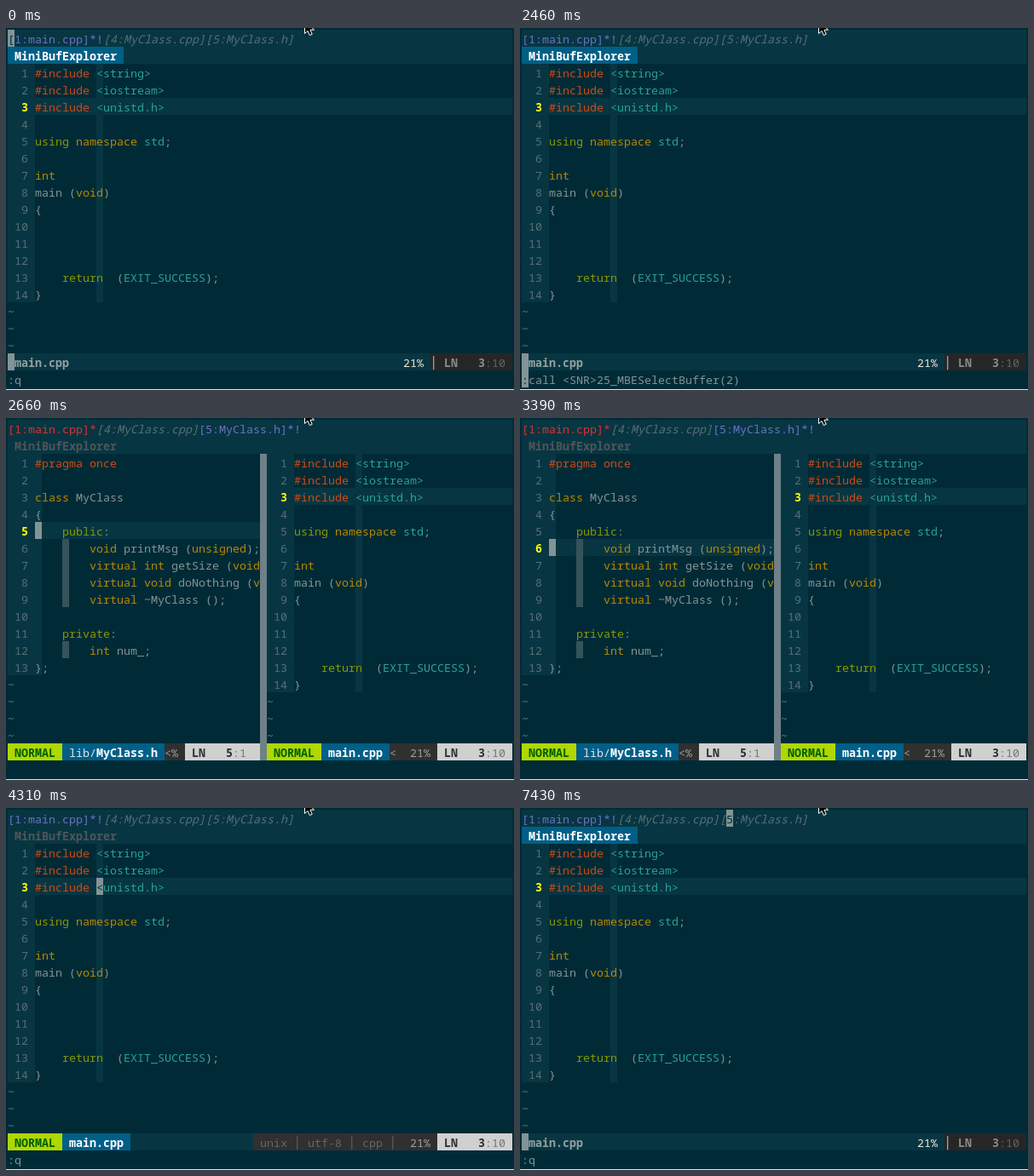
Write an HTML page that moves like this. It is 596 px wide and 425 px high and loops after 8 s.

```html
<!DOCTYPE html>
<html lang="en">
<head>
<meta charset="utf-8">
<title>Buffer explorer session</title>
<style>
html, body { margin: 0; width: 100%; height: 100%; overflow: hidden; background: #002b36; }
#stage { position: absolute; left: 0; top: 0; width: 596px; height: 425px; overflow: hidden;
  font: 13.3333px/22px "Noto Sans Mono", monospace; color: #839496; }
#stage div { position: absolute; white-space: pre; }
.scene { inset: 0; visibility: hidden; }
.edge { left: 0; top: 424px; width: 596px; height: 1px; background: #e4e6e6; }
.pane { overflow: hidden; }
.bar { background: #073642; }
.guide { background: #36535a; }
.split { background: #6f8088; }
.num { color: #586e75; }
.now { color: #ffff00; font-weight: bold; }
.pre { color: #cb4b16; }
.const { color: #2aa198; }
.stmt { color: #859900; }
.type { color: #b58900; }
.tilde { color: #657b83; }
.shown { color: #6c71c4; }
.hidden { color: #586e75; font-style: italic; }
.changed { color: #dc322f; }
.cursor { background: #839496; color: #002b36; }
.mode { background: #afd700; color: #005f00; font-weight: bold; }
.file { background: #005f87; color: #e4e4e4; }
.strong { font-weight: bold; }
.file.strong { color: #fff; }
.dim { color: #4e5659; font-weight: bold; }
.info { background: #303030; color: #666; }
.pct { background: #303030; color: #9e9e9e; }
.place { background: #d0d0d0; color: #303030; font-weight: bold; }
.col { background: #d0d0d0; color: #767676; }
.idleName { color: #93a1a1; font-weight: bold; }
.idlePct { color: #eee8d5; }
.idleRule { background: #262626; color: #d0d0d0; }
.idlePlace { background: #262626; color: #8a8a8a; font-weight: bold; }
.idleCol { background: #262626; color: #626262; }
svg { position: absolute; left: 346px; top: 0; }
</style>
</head>
<body>
<div id="stage"></div>
<script>
const CELL_W = 8, CELL_H = 20, MARGIN = 2, STATUS = 19, COMMAND = 20;
const stage = document.getElementById("stage");

function add(parent, cls, text = "") {
  const node = document.createElement("div");
  node.className = cls;
  node.textContent = text;
  return parent.appendChild(node);
}

function block(parent, col, row, cols, rows, cls) {
  const node = add(parent, cls);
  Object.assign(node.style, {
    left: MARGIN + col * CELL_W + "px", top: MARGIN + row * CELL_H + "px",
    width: cols * CELL_W + "px", height: rows * CELL_H + "px"
  });
  return node;
}

// Writes [text, class] runs one after another on the cell grid.
function write(parent, col, row, ...runs) {
  for (const [text, cls = ""] of runs) {
    block(parent, col, row, text.length, 1, cls).textContent = text;
    col += text.length;
  }
}

const mainSource = `#include <string>
#include <iostream>
#include <unistd.h>

using namespace std;

int
main (void)
{



    return  (EXIT_SUCCESS);
}`.split("\n");

const headerSource = `#pragma once

class MyClass
{
    public:
        void printMsg (unsigned);
        virtual int getSize (void);
        virtual void doNothing (void);
        virtual ~MyClass ();

    private:
        int num_;
};`.split("\n");

const syntax = {
  pre: /^#(include|pragma once)/,
  const: /^(<[^>]*>|(std|EXIT_SUCCESS)\b)/,
  stmt: /^(using|return|public|private)\b/,
  type: /^(int|void|unsigned|virtual|class|namespace)\b/
};

function highlight(line) {
  const tokens = line.match(/#pragma once|#\w+|<[^>]*>|\w+|[^\w#<]+/g) || [];
  return tokens.map(t => [t, Object.keys(syntax).find(k => syntax[k].test(t))]);
}

function pane(scene, col, cols, source, line, cursorCol) {
  const box = block(scene, col, 2, cols, 17, "pane");
  const inner = add(box, "");
  inner.style.left = inner.style.top = -MARGIN + "px";
  block(inner, 0, 0, 4, source.length, "bar");
  block(inner, cursorCol + 3, 0, 1, source.length, "bar");
  block(inner, 0, line - 1, cols, 1, "bar");
  source.forEach((text, i) => {
    write(inner, 0, i, [String(i + 1).padStart(3), i + 1 === line ? "now" : "num"]);
    write(inner, 4, i, ...highlight(text));
    if (/^ {8}/.test(text)) block(inner, 8, i, 1, 1, "guide");
  });
  for (let row = source.length; row < 17; row++) write(inner, 0, row, ["~", "tilde"]);
}

function place(scene, col, line, cursorCol) {
  write(scene, col, STATUS, [" LN   ", "place"], [String(line), "place"],
    [(":" + cursorCol).padEnd(4), "col"]);
}

function activeStatus(scene, col, dir, name) {
  write(scene, col, STATUS, [" NORMAL ", "mode"], [" " + dir, "file"], [name + " ", "file strong"]);
}

function idleStatus(scene, nameCol, blockCol) {
  block(scene, blockCol, STATUS, 1, 1, "cursor");
  write(scene, nameCol, STATUS, ["main.cpp", "idleName"]);
  write(scene, 58, STATUS, ["21%", "idlePct"]);
  write(scene, 62, STATUS, ["│", "idleRule"], [" LN   3", "idlePlace"], [":10 ", "idleCol"]);
}

function frame({ explorer = false, split = false, idle = explorer, headerTabs = false,
                 line = 1, shownLine = line, command = "", cursor }) {
  const scene = add(stage, "scene");
  block(scene, 0, 0, 74, 2, "bar");
  block(scene, 0, STATUS, 74, 1, "bar");

  write(scene, 0, 0, ...(headerTabs
    ? [["[1:main.cpp]*", "changed"], ["[4:MyClass.cpp]", "hidden"], ["[5:MyClass.h]*!", "shown"]]
    : [["[1:main.cpp]*!", "shown"], ["[4:MyClass.cpp][5:MyClass.h]", "hidden"]]));
  write(scene, 0, 1, [" MiniBufExplorer ", explorer ? "file strong" : "dim"]);

  if (split) {
    pane(scene, 0, 37, headerSource, line, 1);
    pane(scene, 38, 36, mainSource, 3, 10);
    block(scene, 37, 2, 1, 18, "split");
    activeStatus(scene, 0, "lib/", "MyClass.h");
    write(scene, 23, STATUS, ["<% ", "pct"]);
    place(scene, 26, shownLine, 1);
  } else {
    pane(scene, 0, 74, mainSource, 3, 10);
  }

  if (idle) {
    idleStatus(scene, split ? 39 : 1, split ? 48 : 0);
  } else {
    activeStatus(scene, split ? 38 : 0, "", "main.cpp");
    if (split) write(scene, 56, STATUS, ["<  21% ", "pct"]);
    else write(scene, 36, STATUS, [" unix │ utf-8 │ cpp │  ", "info"], ["21% ", "pct"]);
    place(scene, 63, 3, 10);
  }

  write(scene, 0, COMMAND, [command]);
  if (cursor) write(scene, cursor[0], cursor[1], [cursor[2], "cursor"]);
  return scene;
}

const explorer = (command, cursor) => frame({ explorer: true, command, cursor });
const header = (line, shownLine, command, cursor = [4, line + 1, " "]) =>
  frame({ split: true, headerTabs: true, line, shownLine, command, cursor });

const message = '"/data/workplace/multiple_source_proj/lib/MyClass.h" 13L, 236C';
const timeline = [
  [0, explorer(":q", [0, 0, "["])],
  [230, explorer(":q")],
  [280, explorer(":q", [30, 0, "5"])],
  [2460, explorer(":call <SNR>25_MBESelectBuffer(2)", [0, COMMAND, ":"])],
  [2510, explorer(message)],
  [2610, frame({ explorer: true, split: true, command: message })],
  [2660, header(5, 5)],
  [3390, header(6, 5)],
  [3440, header(6, 6)],
  [3540, header(7, 6)],
  [3590, header(7, 7)],
  [4200, header(7, 7, ":", [1, COMMAND, " "])],
  [4260, header(7, 7, ":q", [2, COMMAND, " "])],
  [4310, frame({ command: ":q", cursor: [13, 4, "<"] })],
  [6220, explorer(":q", [0, 0, "["])],
  [7380, explorer(":q")],
  [7430, explorer(":q", [30, 0, "5"])]
];

add(stage, "edge");
stage.insertAdjacentHTML("beforeend", `<svg width="20" height="14">
  <path d="M4.5 -9V6.5L8 3.4L10.3 8.6L13.2 7.3L10.9 2.2H15.5Z" fill="#000" stroke="#fff"/></svg>`);

let current;
function tick() {
  const time = performance.now() % 8000;
  const next = timeline.findLast(([start]) => start <= time)[1];
  if (next !== current) {
    if (current) current.style.visibility = "hidden";
    next.style.visibility = "visible";
    current = next;
  }
  requestAnimationFrame(tick);
}
tick();
</script>
</body>
</html>
```
